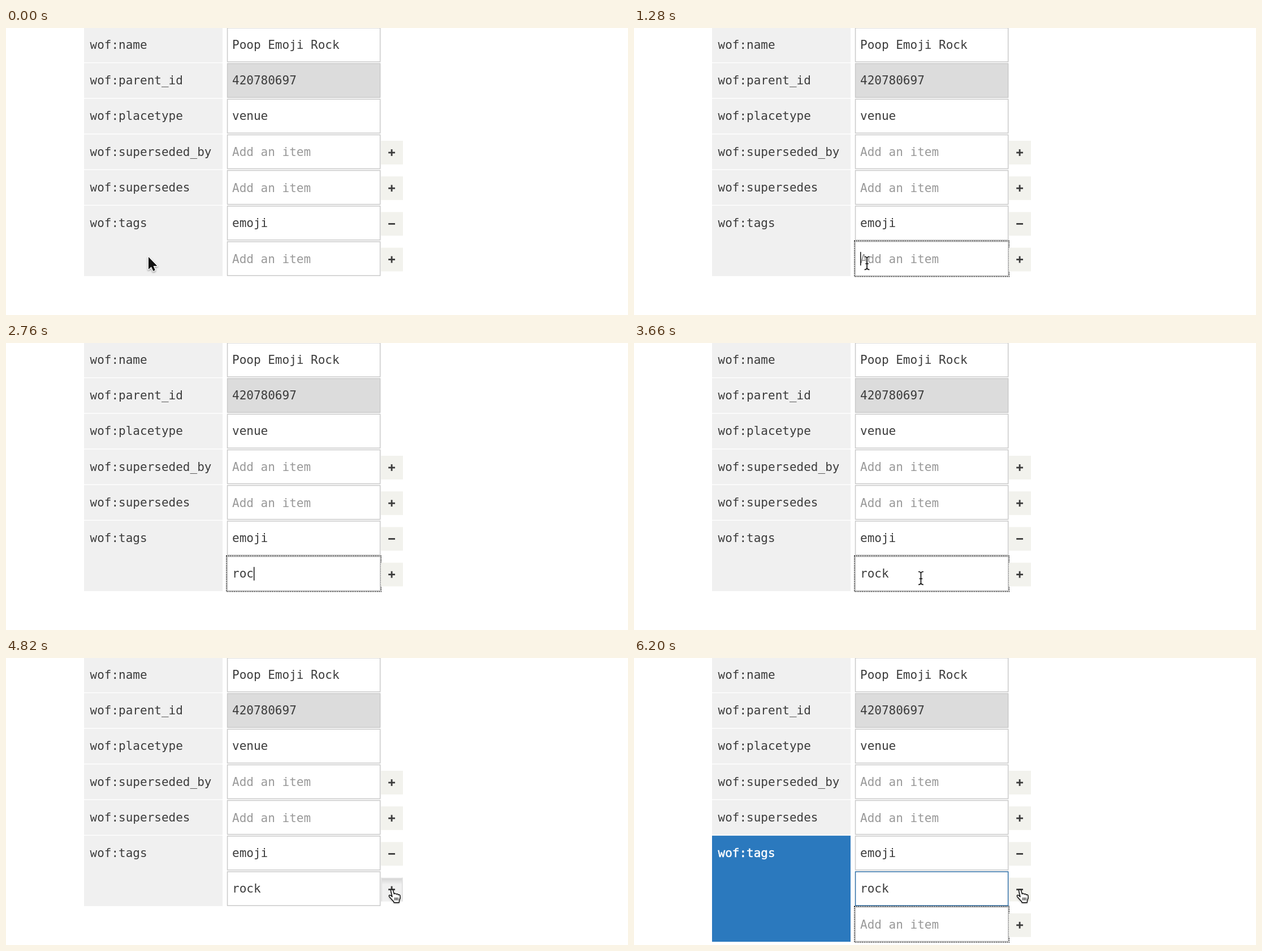
These frames come from a looping animation (1100 px wide and 509 px high, 6220 ms). An HTML page with a canvas:

```html
<!DOCTYPE html>
<html lang="en">
<head>
<meta charset="utf-8">
<title>Property editor</title>
<style>
  html, body { margin: 0; width: 100%; height: 100%; overflow: hidden; background: #fff; }
  canvas { display: block; }
</style>
</head>
<body>
<canvas id="stage" width="1100" height="509"></canvas>
<script>
const ctx = document.getElementById('stage').getContext('2d');
const LOOP = 6220, PITCH = 63.2, BOX_H = 61.6;
const FOCUS = 1160, PRESS = 4440, RELEASE = 4900, BLINK = 400;
const INK = '#3c3c3c', HINT = '#999', BLUE = '#2b79be';
const KEYS = [2460, 2600, 2720, 2900];
const WORD = 'rock', CHAR = 12.64;

const labels = ['name', 'parent_id', 'placetype', 'superseded_by', 'supersedes', 'tags'];
const values = ['Poop Emoji Rock', '420780697', 'venue', '', '', 'emoji'];

// Pointer hot spot: time, x, y
const track = [
  [0, 252, 406], [580, 252, 406], [820, 325, 410], [1080, 412, 417],
  [3300, 412, 417], [3660, 507, 417], [4000, 644, 414], [4160, 669, 408], [4400, 682.5, 410]
];

const rowTop = i => -0.9 + PITCH * i;

function pointerAt(t) {
  const last = track[track.length - 1];
  for (let i = 1; i < track.length; i++) {
    const [t0, x0, y0] = track[i - 1], [t1, x1, y1] = track[i];
    if (t < t1) {
      const k = (t - t0) / (t1 - t0);
      return [x0 + (x1 - x0) * k, y0 + (y1 - y0) * k];
    }
  }
  return [last[1], last[2]];
}

function rect(x, y, w, h, color) {
  ctx.fillStyle = color;
  ctx.fillRect(x, y, w, h);
}

function text(s, x, y, color) {
  ctx.font = '21px "DejaVu Sans Mono", monospace';
  ctx.fillStyle = color;
  ctx.fillText(s, x, y);
}

function label(i, rows, active) {
  rect(138, rowTop(i), 245, PITCH * rows - 1.4, active ? BLUE : '#f0f0f0');
  const y = 37 + PITCH * i, s = 'wof:' + labels[i];
  text(s, 148.5, y, active ? '#fff' : INK);
  if (active) {
    ctx.strokeStyle = '#fff';
    ctx.lineWidth = 0.5;
    ctx.strokeText(s, 148.5, y);
  }
}

function field(i, value, { fill = '#fff', border = '#c9c9c9', focus = false } = {}) {
  const y = rowTop(i);
  rect(390.8, y, 271.6, BOX_H, border);
  rect(392.3, y + 1.5, 268.6, BOX_H - 3, fill);
  if (value) text(value, 400, 37 + PITCH * i, INK);
  else text('Add an item', 400, 37.8 + PITCH * i, HINT);
  if (focus) {
    ctx.strokeStyle = '#000';
    ctx.lineWidth = 1.5;
    ctx.setLineDash([1.6, 1.6]);
    ctx.strokeRect(389.9, y - 0.9, 273.4, BOX_H + 1.8);
    ctx.setLineDash([]);
  }
}

function button(i, plus, pressed) {
  const y = 200 + PITCH * (i - 3), cy = y + 21;
  rect(663, y, 39, 42, '#f2f2ed');
  if (pressed) {
    rect(663, y, 39, 42, '#f0f0f0');
    const g = ctx.createLinearGradient(0, y, 0, y + 12);
    g.addColorStop(0, '#d2d2d2');
    g.addColorStop(1, '#f0f0f0');
    rect(664, y + 1, 37, 12, g);
    rect(663.5, y, 1.5, 42, '#dedede');
    rect(700, y, 1.5, 42, '#dedede');
  }
  rect(676.2, cy - 1.4, 11.8, 2.8, INK);
  if (plus) rect(680.7, cy - 5.9, 2.8, 11.8, INK);
}

function caret(i, column) {
  rect(400 + column * CHAR, 18 + PITCH * i, 1.5, 24, '#111');
}

function shadow(on) {
  ctx.shadowColor = on ? 'rgba(0,0,0,.4)' : 'transparent';
  ctx.shadowBlur = on ? 3 : 0;
  ctx.shadowOffsetY = on ? 1.5 : 0;
}

function arrow() {
  const p = new Path2D('M0 0V22L5 17.4L8.3 25L11.8 23.5L8.6 16H15.4Z');
  ctx.strokeStyle = '#fff';
  ctx.lineWidth = 2.8;
  shadow(true);
  ctx.stroke(p);
  shadow(false);
  ctx.fillStyle = '#111';
  ctx.fill(p);
}

function beam() {
  const p = new Path2D('M-4.5 -11.5Q-.5 -11.5 0 -8.5Q.5 -11.5 4.5 -11.5M0 -8.5V8.5' +
    'M-4.5 11.5Q-.5 11.5 0 8.5Q.5 11.5 4.5 11.5M-2.8 1H2.8');
  ctx.strokeStyle = '#fff';
  ctx.lineWidth = 3.6;
  ctx.stroke(p);
  ctx.strokeStyle = '#111';
  ctx.lineWidth = 1.7;
  ctx.stroke(p);
}

function hand() {
  ctx.translate(-6.5, -0.3);
  const p = new Path2D('M4.6 3.2C4 .8 7.5 0 8.4 2.2L10.4 8.8C11.5 7.4 13.8 7.7 14 9.3' +
    'C15 8.4 17.3 8.7 17.5 10.4C18.6 9.5 20.6 10 21 12C21.6 14.8 21 17.5 19.6 20' +
    'L19.2 24H10.2L9.6 22.2C7 20 5.2 17.3 2.2 14C.2 11.6 1.9 10 4 11.2L7 13.8Z');
  ctx.fillStyle = '#fff';
  shadow(true);
  ctx.fill(p);
  shadow(false);
  ctx.strokeStyle = '#111';
  ctx.lineWidth = 1.5;
  ctx.stroke(p);
  ctx.lineWidth = 1.2;
  ctx.stroke(new Path2D('M11.8 15V20M14.4 15V20M17 15V20'));
}

function pointer(t) {
  if (t >= KEYS[0] && t < 3300) return;
  const [x, y] = pointerAt(t);
  ctx.save();
  ctx.translate(x, y);
  ctx.lineJoin = 'round';
  if (x < 391) arrow();
  else if (x < 662) beam();
  else hand();
  ctx.restore();
}

function draw(t) {
  const added = t >= RELEASE;
  const focused = t >= FOCUS && t < PRESS;
  const pressed = t >= PRESS && !added;
  const typed = KEYS.filter(k => t >= k).length;

  rect(0, 0, 1100, 509, '#fff');
  labels.forEach((_, i) => label(i, i < 5 ? 1 : added ? 3 : 2, i === 5 && added));
  values.forEach((v, i) => field(i, v, { fill: i === 1 ? '#dcdcdc' : '#fff' }));
  field(6, WORD.slice(0, typed), { focus: focused, border: added ? '#2e6da4' : '#c9c9c9' });
  if (added) field(7, '', { focus: true });

  if (focused || added) {
    const since = added ? RELEASE : typed ? KEYS[typed - 1] : FOCUS;
    if (Math.floor((t - since) / BLINK) % 2 === 0) caret(added ? 7 : 6, added ? 0 : typed);
  }

  button(3, true);
  button(4, true);
  button(5, false);
  button(6, !added, pressed);
  if (added) button(7, true);
  pointer(t);
}

const start = performance.now();
function tick() {
  draw((performance.now() - start) % LOOP);
  requestAnimationFrame(tick);
}
tick();
</script>
</body>
</html>
```
